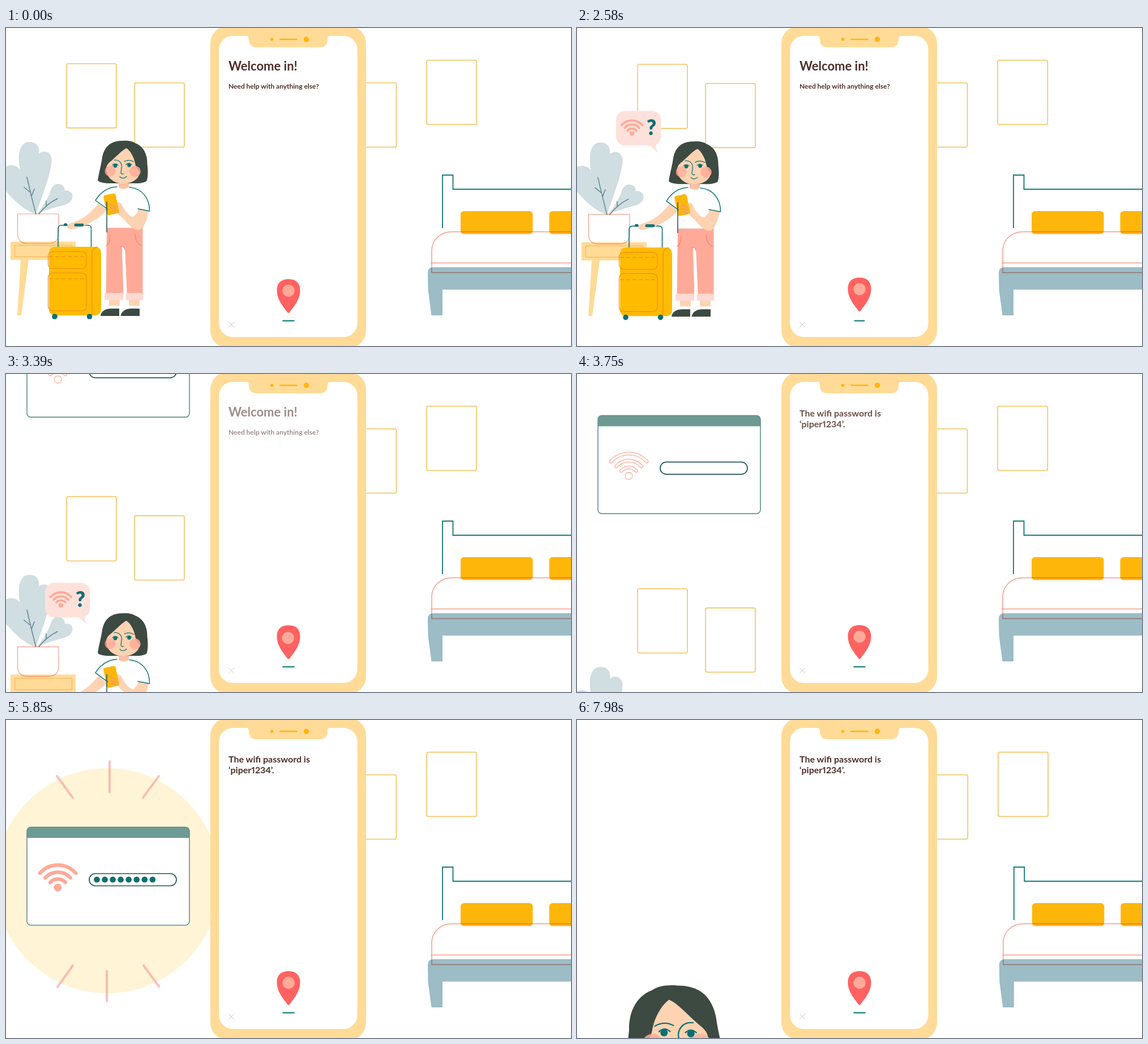
An HTML page that plays this animation: 998x561 px, repeating every 8000 ms.

```html
<!DOCTYPE html>
<html lang="en">
<head>
<meta charset="utf-8">
<title>Check-in helper</title>
<style>
  html, body { margin: 0; width: 100%; height: 100%; overflow: hidden; background: #fff; }
  svg { display: block; width: 100vw; height: 100vh; }
  text { font-family: Lato, "Open Sans", sans-serif; font-weight: 700; fill: #4f2e28; font-variant-numeric: proportional-nums; }
  .line { fill: none; stroke-linecap: round; stroke-linejoin: round; }
  .teal { stroke: #0e7476; }
  .frame { fill: none; stroke: #f5c25f; stroke-width: 1.6; }
  .coral { fill: none; stroke: #f49d8a; stroke-width: 1.5; mix-blend-mode: multiply; }
  .seam { fill: none; stroke: #ee8a1e; stroke-width: 1.2; }
  .skin { fill: #fdd3b2; }
  .dark { fill: #3c4a42; }
  .deep { fill: #0e6f73; }
  .pink { fill: #ffaa98; }
  .gold { fill: #ffb60b; }
  .sand { fill: #ffdb97; }
  .leaf { fill: #d0dde1; }
</style>
</head>
<body>
<svg viewBox="0 0 998 561" preserveAspectRatio="none">
  <defs>
    <g id="head">
      <path class="dark" d="M162 269C164 255 168 243 170 228C174 208 186 199 205 199C216 198 224 200 228 203C242 208 250 222 249.500 240C251 252 251 262 248.500 270C240 275 230 274 222 274H178C170 273 165 272 162 269Z"/>
      <path class="skin" d="M213 212C205 215 194 228 184 236C179 240 177 244 177 249C177 263 190 274.500 206.500 274.500C223 274.500 236 266 236 254C232 250 229 245 228 238C226 228 220 217 213 212Z"/>
      <circle class="pink" cx="184" cy="252.500" r="9.500" opacity=".75"/>
      <circle class="pink" cx="228" cy="253" r="9.800" opacity=".85"/>
      <g class="line teal" stroke-width="1.250">
        <path d="M191 233C199 232 204 237 204.500 244L203 255Q204 259 208 257"/>
        <path d="M209 235.500Q217 231 226 236"/>
        <path d="M201 262.500Q207 267.500 213 262"/>
        <path d="M188 242Q193 237.500 198 242M212 241Q217 236.500 222 241"/>
      </g>
      <circle class="deep" cx="193" cy="243" r="3.400"/>
      <circle class="deep" cx="217.500" cy="242" r="3.400"/>
    </g>
  </defs>

  <g id="room">
    <rect class="frame" x="601.500" y="96.800" width="88" height="113.400" rx="3"/>
    <rect class="frame" x="743" y="56.800" width="88.300" height="113.400" rx="3"/>
    <path class="line teal" stroke-width="1.800" style="stroke-linecap:butt;stroke-linejoin:miter" d="M771 353V259.500H789.500V284.500H1002"/>
    <rect class="gold" x="803" y="323" width="127.500" height="40.500" rx="6"/>
    <rect class="gold" x="959.500" y="323" width="127.500" height="40.500" rx="6"/>
    <path fill="#9cbcc6" d="M745 432Q745 422 755 422H1002V461.500H771V507H751.500L745.500 462Z"/>
    <path class="coral" d="M1002 431.500H752V393C752 373 768 359.500 788 359.500H1002M750 414.500H1002"/>
  </g>

  <g id="back">
    <rect class="frame" x="107" y="63" width="88" height="113.400" rx="3"/>
    <rect class="frame" x="227" y="96.800" width="88" height="113.400" rx="3"/>
    <path class="leaf" d="M53 328C30 322 8 298 -6 280C-14 262 -6 242 8 242C16 242 22 246 25 250C21 235 20 201 41 201C56 201 60 212 58 222C66 214 80 218 80.500 232C81 250 68 285 53 328Z"/>
    <path class="leaf" d="M55 328C66 314 74 300 78 290C80 280 86 275 92 275C100 275 104 281 104 287C112 286 118 291 117.500 297C117 306 108 312 96 314C82 318 68 322 55 328Z"/>
    <path class="line" stroke="#5f8791" stroke-width="1.500" d="M53 328C48 310 42 285 37 263M45 297L50 284M43 290L32 281M58 328C66 318 78 307 91 301M71 315V305"/>
    <path class="sand" d="M8 377H123V409H8ZM26 409H40L27 507H20ZM91 409H105L111 507H104Z"/>
    <rect x="15.500" y="383.500" width="101" height="20" fill="none" stroke="#f3b566" stroke-width="1.200"/>
    <path class="coral" style="stroke-width:1.200" d="M20.500 328H93V362Q93 380 75 380H38Q20.500 380 20.500 362Z"/>
  </g>

  <g id="front">
    <path class="line teal" stroke-width="1.600" d="M92 387V354Q92 348 98 348H145Q150.500 348 150.500 354V387"/>
    <rect x="76" y="386" width="92" height="121" rx="10" fill="#fb0"/>
    <path class="seam" d="M152 506V396Q153 388 162 386"/>
    <rect class="seam" x="74.500" y="394.500" width="67.500" height="30" rx="8"/>
    <rect class="seam" x="74.500" y="432" width="67.500" height="67" rx="8"/>
    <path class="seam" stroke-dasharray="7 4" d="M76 403.500H141M76 442.500H141"/>
    <circle class="deep" cx="86" cy="509" r="4.800"/>
    <circle class="deep" cx="147.500" cy="509" r="4.800"/>

    <path class="skin" d="M182 479H201V490H182ZM217 479H236V490H217Z"/>
    <path class="dark" d="M167 508C168 499 176 495 186 495H200V508ZM202.500 508C204 499 212 495 221 495H236V508Z"/>
    <path class="skin" d="M199 268H217V290H199Z"/>
    <path fill="#fdbfa5" d="M199 272H217V280Q208 284 199 281Z"/>
    <path fill="#fff" d="M196 280Q208 288 218 281C240 283 254 300 253.500 322L240 320V354H178V320L158 306C168 288 180 281 196 280Z"/>
    <path class="pink" d="M178 352.500H241.500V468H213.500L210 391Q208 387 205 386L207.500 468H176.500Z"/>
    <path fill="#fff" d="M205 386Q209 386 210 391L213.500 468H207.500Z"/>
    <path fill="#ffdad2" d="M174 467.500H207V480H174ZM211.500 467.500H242.500V480H211.500Z"/>
    <path class="line" stroke="#f2826f" stroke-width="1.200" d="M177 384Q184 380 184 366M228 364Q229 380 240 384M202 385Q209 385 210 391"/>
    <path class="skin" d="M163 309L178 321C166 336 148 344 134 351L117 355C108 355 106 350 110 346C120 342 142 338 163 309Z"/>
    <path class="line" stroke="#0e7476" stroke-width="5" d="M104.500 347H106M123 347.500H135"/>
    <path class="skin" d="M234 319L252 322C250 336 245 350 238 355C230 360 218 350 208 337C200 331 193 324 194 312C198 304 203 306 206 315C212 325 218 332 224 333C230 330 233 324 234 319Z"/>
    <rect class="gold" x="175" y="293" width="22" height="36" rx="4" transform="rotate(-12 186 311)"/>
    <path class="line" stroke="#f3a060" stroke-width="2.500" d="M184 311L194 316M184 317L195 321M187 323L194 325"/>
    <path class="line teal" stroke-width="1.500" d="M196 280C180 281 168 288 158 304L179 319.500M218 281C240 283 254 300 253.500 323L233 319"/>
    <path class="line" stroke="#234f4c" stroke-width="1.500" d="M178 307V360"/>
    <use href="#head"/>

    <g id="bubble">
      <rect x="69" y="145" width="79.500" height="61" rx="16" fill="#ffe1db"/>
      <path fill="#ffe1db" d="M122 204C130 205 136 214 143.500 218.500C139 212 139 208 139 196Z"/>
      <g id="smallWifi" transform="translate(97 186.500) scale(.58)"></g>
      <text x="131.500" y="187.500" font-size="37" text-anchor="middle" style="font-weight:900;fill:#0e6f73">?</text>
    </g>
  </g>

  <g id="panel">
    <circle id="sun" cx="179" cy="283.500" fill="#fff4d6"/>
    <g id="rays" class="line" stroke="#f59a95" stroke-width="4" opacity=".6"></g>
    <rect x="37" y="189" width="287" height="173" rx="7" fill="#fff"/>
    <path fill="#6e9a94" d="M37 208V196Q37 189 44 189H317Q324 189 324 196V208Z"/>
    <rect x="37" y="189" width="287" height="173" rx="7" fill="none" stroke="#64908c" stroke-width="1.600"/>
    <g id="bigWifi" transform="translate(91.500 298.500)"></g>
    <rect x="147" y="271" width="154" height="21.500" rx="10.700" fill="#fff" stroke="#1f5655" stroke-width="1.700"/>
    <g id="dots" class="deep"></g>
  </g>

  <g id="closeup"><use href="#head" transform="translate(574 84.500) scale(-1.932 1.932)"/></g>

  <rect class="sand" x="361" y="-3" width="275" height="567" rx="30"/>
  <rect x="376.300" y="14" width="244.200" height="531" rx="24" fill="#fff"/>
  <path class="sand" d="M424 13H573Q568 14 568 20Q568 34 554 34H443Q429 34 429 20Q429 14 424 13Z"/>
  <circle class="gold" cx="469.500" cy="20" r="2.700"/>
  <path class="line" stroke="#ffb60b" stroke-width="2.500" d="M484 20H513.500"/>
  <circle class="gold" cx="530.500" cy="20" r="4.700"/>
  <g id="welcome">
    <text x="393" y="75" font-size="22">Welcome in!</text>
    <text x="393" y="106.500" font-size="12">Need help with anything else?</text>
  </g>
  <g id="answer" font-size="16">
    <text x="393" y="75">The wifi password is</text>
    <text x="393" y="93.500">‘piper1234’.</text>
  </g>
  <path id="cross" class="line" stroke="#c4c4c4" d="M393.500 518.500L403 528M403 518.500L393.500 528"/>
  <g id="pin">
    <path fill="#ff6261" d="M499 443C511 443 519.500 449 519.500 463C519.500 480 507 493 501 501.500Q499 504 497 501.500C491 493 478.500 480 478.500 463C478.500 449 487 443 499 443Z"/>
    <circle id="eye" class="pink" cx="499" cy="463.500" r="10.700"/>
  </g>
  <path id="base" class="line" stroke="#278a8a" stroke-width="2.600"/>
</svg>
<script>
const LOOP = 8000;
const $ = id => document.getElementById(id);
const clamp = x => Math.min(1, Math.max(0, x));
const ramp = (t, a, b) => clamp((t - a) / (b - a));
const smooth = x => x * x * (3 - 2 * x);
const outCubic = x => 1 - (1 - x) ** 3;
const outBack = x => 1 + 2.7 * (x - 1) ** 3 + 1.7 * (x - 1) ** 2;
const set = (el, attrs) => { for (const k in attrs) el.setAttribute(k, attrs[k]); };
const shift = (id, x, y) => set($(id), { transform: `translate(${x} ${y})` });

function add(parent, tag, attrs) {
  const el = document.createElementNS('http://www.w3.org/2000/svg', tag);
  set(el, attrs);
  return parent.appendChild(el);
}

// Eased value through [time, value] stops
function track(t, stops) {
  if (t <= stops[0][0]) return stops[0][1];
  for (let i = 1; i < stops.length; i++) {
    const [a, u] = stops[i - 1], [b, v] = stops[i];
    if (t < b) return u + (v - u) * smooth((t - a) / (b - a));
  }
  return stops[stops.length - 1][1];
}

// Three arcs over a dot; each part has a white core that turns it into an outline
function makeWifi(parent) {
  const parts = [0, 18, 30, 42.500].map(r => {
    const g = add(parent, 'g', { class: 'line', stroke: '#ffaa98' });
    if (!r) {
      add(g, 'circle', { cy: -3, r: 7, class: 'pink', stroke: 'none' });
      return { g, core: add(g, 'circle', { cy: -3, r: 5.700, fill: '#fff', stroke: 'none' }) };
    }
    const x = r * Math.sin(.84), y = -r * Math.cos(.84);
    const d = `M${-x} ${y}A${r} ${r} 0 0 1 ${x} ${y}`;
    add(g, 'path', { d, 'stroke-width': 6.400 });
    return { g, core: add(g, 'path', { d, stroke: '#fff', 'stroke-width': 3.800 }) };
  });
  return parts;
}

const smallWifi = makeWifi($('smallWifi'));
const bigWifi = makeWifi($('bigWifi'));
smallWifi.forEach(p => set(p.core, { opacity: 0 }));

const dots = Array.from({ length: 8 }, (_, i) =>
  add($('dots'), 'circle', { cx: 160.500 + 14.050 * i, cy: 281.500, r: 5.300 }));

// Inner end, outer end
const rays = [
  [118, 137, 90, 99], [183, 127, 183, 73], [242, 137, 270, 99],
  [118, 433, 91, 471], [178, 443, 178, 496], [243, 433, 270, 470]
].map(p => ({ p, el: add($('rays'), 'path', {}) }));

function drawRays(t) {
  const grow = outCubic(ramp(t, 5400, 5800));
  const trim = ramp(t, 7105, 7455);
  $('rays').style.display = grow > 0 && trim < 1 ? '' : 'none';
  for (const { p: [x, y, u, v], el } of rays) {
    const at = k => `${x + (u - x) * k} ${y + (v - y) * k}`;
    set(el, { d: `M${at(Math.min(trim, grow))}L${at(grow)}` });
  }
}

function drawPin(t) {
  const dx = track(t, [[1400, 0], [1700, 3.500], [2050, 0], [7250, 0], [7420, 3], [7600, 0]]);
  const dy = track(t, [[480, 0], [900, -3], [1300, 0], [2150, 0], [2580, -2.700], [3060, 1], [3500, 0]]);
  const look = track(t, [[2650, 0], [3060, 1], [3600, 0]]);
  const half = 9.500 + .5 * Math.min(0, dy);
  shift('pin', dx, dy);
  set($('eye'), { cx: 499 - 2.600 * look, cy: 463.500 + 6 * look });
  set($('base'), { d: `M${499 - half} 516.500H${499 + half}` });
}

function draw(t) {
  const drift = .8 * smooth(ramp(t, 6030, 6810));
  shift('room', drift, 0);

  // The scene falls away, the nearer layer faster
  const fall = (Math.max(0, t - 2500) / 560) ** 2.130;
  const gone = t > 4500 ? 'none' : '';
  shift('back', 0, 57 * fall);
  shift('front', 0, 83 * fall);
  $('back').style.display = $('front').style.display = gone;

  const pop = outBack(ramp(t, 520, 860));
  $('bubble').style.display = t > 520 ? '' : 'none';
  set($('bubble'), { transform: `translate(143 218) scale(${Math.max(0, pop)}) translate(-143 -218)` });
  smallWifi.forEach((p, i) => set(p.g, { opacity: ramp(t, 1200 + 170 * i, 1320 + 170 * i) }));

  const drop = -116 * (Math.max(0, 4380 - t) / 630) ** 2;
  const lift = -60 * (Math.max(0, t - 6600) / 570) ** 2.130;
  $('panel').style.display = t > 3100 && t < 7960 ? '' : 'none';
  shift('panel', drift, drop + lift);
  bigWifi.forEach((p, i) => set(p.core, { opacity: 1 - ramp(t, 4000 + 120 * i, 4120 + 120 * i) }));
  dots.forEach((d, i) => set(d, { opacity: t >= 4530 + 70 * i ? 1 : 0 }));
  const sun = outCubic(ramp(t, 5220, 5640)) * (1 - smooth(ramp(t, 7230, 7600)));
  set($('sun'), { r: 198.500 * sun });
  drawRays(t);

  $('closeup').style.display = t > 7600 ? '' : 'none';
  shift('closeup', 0, .5 * (7980 - t));

  const swap = ramp(t, 3550, 3790);
  set($('welcome'), { opacity: 1 - ramp(t, 3300, 3500) });
  set($('answer'), { opacity: swap });
  set($('cross'), { opacity: t < 3300 ? 1 : t < 3550 ? 1 - .6 * ramp(t, 3300, 3500) : .4 + .6 * swap ** 2 });
  drawPin(t);
}

const start = performance.now();
function tick() {
  draw((performance.now() - start) % LOOP);
  requestAnimationFrame(tick);
}
tick();
</script>
</body>
</html>
```
